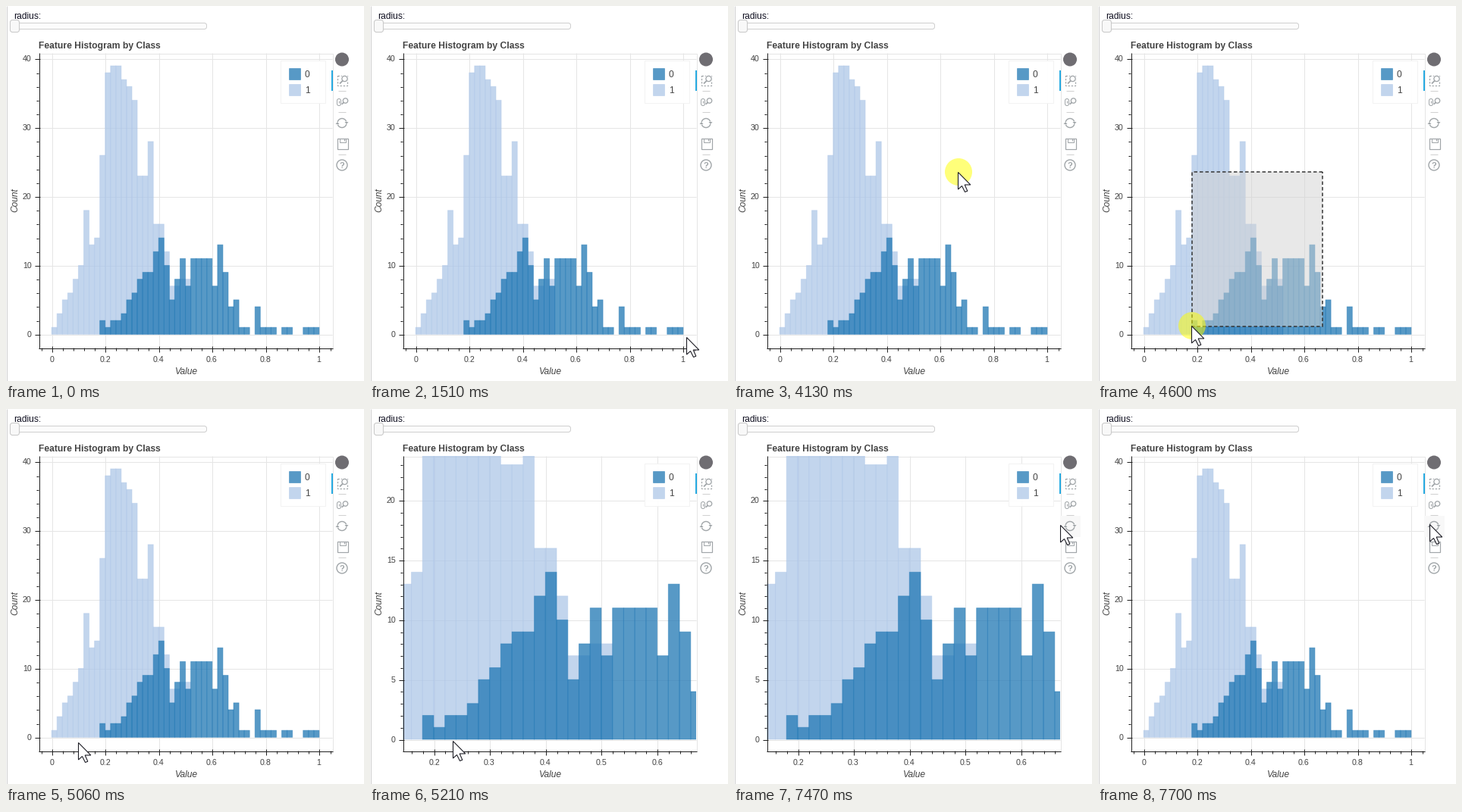
Recreate the animation shown at these times as a matplotlib script. Size 472 by 495 pixels, loop 8000 ms.

```python
import numpy as np
import matplotlib.pyplot as plt
from matplotlib.animation import FuncAnimation
from matplotlib.collections import LineCollection, PolyCollection
from matplotlib.colors import to_rgba
from matplotlib.patches import Arc, Circle, FancyBboxPatch, Polygon, Rectangle

W, H, DPI = 472, 495, 100
LOOP, STEP = 8000, 20
HOLD = 75  # ms between pointer positions
PT = 72 / DPI  # points per pixel
LEFT, TOP, RIGHT, BOTTOM = 43, 62, 430, 451
BLUE, PALE, INK, GRID, ICON = "#1f77b4", "#aec7e8", "#444444", "#e5e5e5", "#a1a6a9"

# Pointer moves: start, end, from, to and an optional bend
MOVES = [
    (1430, 1740, (406, 468), (480, 270)),
    (1980, 2220, (437, 150), (449, 156)),
    (2610, 2760, (445, 145), (440, 118)),
    (3230, 3990, (440, 102), (271, 158), (390, 800)),
    (4070, 4130, (285, 200), (296, 219)),
    (4220, 4600, (291, 227), (124, 422)),
    (4670, 5060, (122, 424), (96, 440)),
    (5210, 5520, (110, 438), (120, 434)),
    (6070, 6540, (125, 430), (327, 303), (400, 240)),
    (6700, 7470, (322, 308), (431, 153), (330, 580)),
    (7550, 7700, (437, 152), (438, 152)),
]
DRAG_START, DRAG_END, DRAG_CLEAR = 4220, 4600, 4920
PRESS, RELEASE = 4130, 4750
ZOOM_IN, RESET = 5210, 7620
ANCHOR = (295.5, 218.5)
ARROW = np.array([(-.5, .5), (-.5, 23), (4.5, 18.5), (8.5, 26.5), (11.8, 25.2),
                  (8.2, 17), (15.8, 17)])

plt.rcParams["font.family"] = "Liberation Sans"
fig = plt.figure(figsize=(W / 100, H / 100), dpi=DPI, facecolor="white")
ax = fig.add_axes([0, 0, 1, 1])
ax.set(xlim=(0, W), ylim=(H, 0))
ax.axis("off")
plot_area = Rectangle((LEFT, TOP), RIGHT - LEFT, BOTTOM - TOP, transform=ax.transData)


def outline(knots, bumps, gaps=()):
    """Bar counts along a line through a few knots, with single peaks and gaps."""
    bins, heights = zip(*knots)
    counts = np.floor(np.interp(np.arange(bins[-1] + 1), bins, heights) + .5)
    for i, extra in bumps:
        counts[i] += extra
    counts[list(gaps)] = 0
    return counts


pale_counts = outline([(0, 1), (5, 10), (8, 14), (10, 38), (12, 39), (15, 34),
                       (16, 23), (17, 23), (19, 16), (20, 16), (22, 7), (25, 8)],
                      bumps=[(6, 7), (18, 8)])
blue_counts = outline([(9, 2), (10, 1), (13, 3), (16, 8), (18, 9), (20, 14),
                       (22, 5), (24, 11), (25, 7), (26, 11), (29, 11), (30, 7),
                       (31, 13), (33, 4), (34, 5), (35, 1), (49, 1)],
                      bumps=[(38, 3)], gaps=[*range(9), 37, 42, 45, 46])


def crisp(v):
    return np.floor(v) + .5


def lines(segs, color, width=1, z=1):
    art = LineCollection(segs, colors=color, linewidths=width * PT, zorder=z)
    return ax.add_collection(art, autolim=False)


def text(x, y, s, size=12, z=5, **kw):
    kw.setdefault("color", INK)
    kw.setdefault("va", "baseline")
    return ax.text(x, y, s, fontsize=size * PT, zorder=z, **kw)


def shape(patch, fill="none", edge="none", width=1, z=1, **kw):
    patch.set(facecolor=fill, edgecolor=edge, linewidth=width * PT, zorder=z, **kw)
    return ax.add_patch(patch)


def rounded(x, y, w, h, r, fill, edge, z=1):
    box = FancyBboxPatch((x, y), w, h, boxstyle=f"round,pad=0,rounding_size={r}")
    return shape(box, fill, edge, z=z)


def bars(counts, color, to_x, to_y, z):
    boxes = []
    for i, n in enumerate(counts):
        if n:
            x0, x1, y0, y1 = to_x(i * .02), to_x(i * .02 + .02), to_y(0), to_y(n)
            boxes.append([(x0, y0), (x0, y1), (x1, y1), (x1, y0)])
    art = PolyCollection(boxes, facecolors=[to_rgba(color, .75)],
                         edgecolors=[to_rgba(color, .45)], linewidths=PT, zorder=z)
    art.set_snap(False)
    ax.add_collection(art, autolim=False)
    art.set_clip_path(plot_area)
    return art


def ticks_between(lo, hi, step):
    return np.arange(np.ceil(lo / step), np.floor(hi / step) + 1) * step + 0.0


def view(x0, x_scale, y0, y_scale, x_step, y_step):
    """Grid, bars, ticks and labels for one zoom state."""
    to_x = lambda v: x0 + x_scale * v
    to_y = lambda v: y0 - y_scale * v
    x_lim = (LEFT - x0) / x_scale, (RIGHT - x0) / x_scale
    y_lim = (y0 - BOTTOM) / y_scale, (y0 - TOP) / y_scale
    grid, ticks, art = [], [], []
    for v in ticks_between(*x_lim, x_step):
        x = crisp(to_x(v))
        grid.append([(x, TOP), (x, BOTTOM)])
        ticks.append([(x, BOTTOM - 2), (x, BOTTOM + 6)])
        art.append(text(x, 470, f"{v:.1f}".replace(".0", ""), 10.67, ha="center"))
    for v in ticks_between(*y_lim, y_step):
        y = crisp(to_y(v))
        grid.append([(LEFT, y), (RIGHT, y)])
        ticks.append([(LEFT - 5, y), (LEFT + 2, y)])
        art.append(text(33.5, y + 3.8, f"{v:.0f}", 10.67, ha="right"))
    for v in ticks_between(*x_lim, x_step / 5):
        x = crisp(to_x(v))
        ticks.append([(x, BOTTOM), (x, BOTTOM + 4)])
    for v in ticks_between(*y_lim, y_step / 5):
        y = crisp(to_y(v))
        ticks.append([(LEFT - 3, y), (LEFT, y)])
    art += [lines(grid, GRID, z=1), lines(ticks, "#222222", z=4),
            bars(pale_counts, PALE, to_x, to_y, 2),
            bars(blue_counts, BLUE, to_x, to_y, 3)]
    return art


def magnifier(x, y, r, reach):
    shape(Circle((x, y), r), edge=ICON, width=1.3, z=3)
    d = r * .7
    lines([[(x - d, y + d), (x - d - reach, y + d + reach)]], ICON, 1.8, 3)


def draw_slider():
    text(10.5, 17, "radius:", color="#111122")
    rounded(7.5, 22.5, 257, 8, 3, "#fcfcfc", "#cfcfcf")
    rounded(5.5, 18.5, 12, 16, 3, "#f8f8f8", "#c8c8c8", 2)


def draw_frame():
    lines([[(.5, 0), (.5, H)], [(0, H - .5), (W, H - .5)]], "#cccccc")
    shape(Rectangle((LEFT + .5, TOP + .5), RIGHT - LEFT, BOTTOM - TOP), edge=GRID)
    lines([[(LEFT + .5, TOP), (LEFT + .5, BOTTOM + 1)],
           [(LEFT, BOTTOM + .5), (RIGHT + 1, BOTTOM + .5)]], "#222222", z=4)
    text(43, 56, "Feature Histogram by Class", 12.1, weight="bold")
    text(238, 486, "Value", style="italic", ha="center")
    text(18.5, 256, "Count", style="italic", ha="right", va="center", rotation=90)


def draw_legend():
    shape(Rectangle((361.5, 71.5), 59, 56), (1, 1, 1, .95), "#f2f2f2", z=4)
    for y, color, label in [(82, BLUE, "0"), (103, PALE, "1")]:
        shape(Rectangle((372.5, y - .5), 15, 15), to_rgba(color, .75),
              to_rgba(color, .45), z=5)
        text(394, y + 12, label)


def draw_toolbar():
    shape(Circle((443, 70.5), 9), "#6f6d72", z=3)
    shape(Rectangle((429, 85), 2, 27), "#26aae1", z=3)
    lines([[(438, y), (448, y)] for y in (111.5, 139.5, 195.5)], "#d0d0d0", z=3)

    shape(Rectangle((436.5, 91.5), 13, 13), edge=ICON, width=1.2, z=3,
          linestyle=(0, (2, 1.5)))
    shape(Circle((446.5, 96), 5), "white", z=3)
    magnifier(446.5, 96, 3.6, 4)

    rounded(436.5, 122.5, 5, 9, 2.5, "none", ICON, 3)
    lines([[(439, 125), (439, 128)]], ICON, 1.2, 3)
    magnifier(447.5, 125, 3.2, 2.5)

    for a, x, y, s in [(195, 449, 154, 1), (15, 437, 155, -1)]:
        ax.add_patch(Arc((443, 154.5), 12, 12, theta1=a, theta2=a + 145,
                         color=ICON, lw=1.4 * PT, zorder=3))
        shape(Polygon([(x - 2.5, y - s), (x + 2.5, y - s), (x, y + 2 * s)]), ICON, z=3)

    shape(Rectangle((436.5, 174.5), 14, 14), edge=ICON, width=1.2, z=3)
    shape(Rectangle((439.5, 174.5), 8, 5), edge=ICON, z=3)
    lines([[(445.5, 175), (445.5, 178)]], ICON, 1.2, 3)

    shape(Circle((443, 210), 7), edge=ICON, width=1.4, z=3)
    text(443, 214, "?", 11, color=ICON, ha="center", weight="bold")


draw_slider()
draw_frame()
draw_legend()
draw_toolbar()
full_view = view(60.2, 352.7, 433.3, 9.085, .2, 10)
zoom_view = view(84 - 736.5 * .2, 736.5, 436, 15.76, .1, 5)

hover = shape(Rectangle((430, 0), 27, 28), "#f8f8f8", z=2)
select = shape(Rectangle(ANCHOR, 0, 0), to_rgba("lightgrey", .5), "#333333", 1.5, 6,
               linestyle=(0, (3, 2)))
spot = shape(Circle((0, 0), 18), (1, 1, 0, .52), z=7)
arrow = shape(Polygon(ARROW), "white", "#1c1c24", 1.1, 8)


def pointer(t):
    """Stepped pointer position on an eased curve, or None before it first shows."""
    move = next((m for m in reversed(MOVES) if m[0] <= t), None)
    if move is None:
        return None
    start, end, a, b, *bend = move
    a, b = np.array(a), np.array(b)
    c = np.array(bend[0]) if bend else (a + b) / 2
    steps = max(round((end - start) / HOLD), 1)
    u = min(int((t - start) / (end - start) * steps + 1e-6), steps) / steps
    u = u * u * (3 - 2 * u)
    return (1 - u) ** 2 * a + 2 * u * (1 - u) * c + u * u * b


def draw(i):
    t = i * STEP + STEP / 2
    zoomed = ZOOM_IN <= t < RESET
    for art in full_view:
        art.set_visible(not zoomed)
    for art in zoom_view:
        art.set_visible(zoomed)

    pos = pointer(t)
    arrow.set_visible(pos is not None)
    spot.set_visible(PRESS <= t < RELEASE)
    select.set_visible(DRAG_START <= t < DRAG_CLEAR)
    hover.set_visible(False)
    if pos is not None:
        x, y = pos
        arrow.set_xy(ARROW + np.round(pos))
        spot.center = x, y
        if 430 <= x < 457 and 85 <= y < 225:
            hover.set_y(85 + 28 * int((y - 85) // 28))
            hover.set_visible(True)
    if select.get_visible():
        x, y = pointer(min(t, DRAG_END))
        select.set_bounds(*ANCHOR, x - .5 - ANCHOR[0], y + .5 - ANCHOR[1])
    return []


anim = FuncAnimation(fig, draw, frames=LOOP // STEP, init_func=lambda: [],
                     interval=STEP, repeat=True, repeat_delay=0, blit=False)
plt.show()
```
